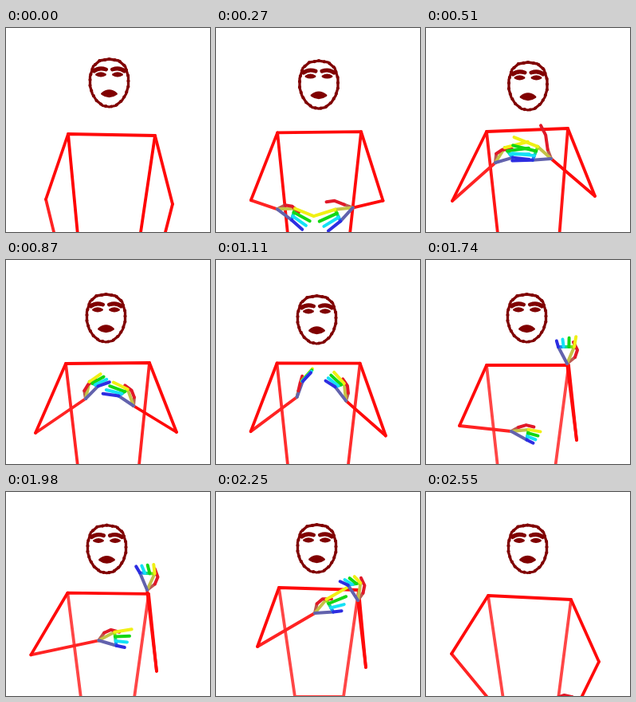
These frames come from a looping animation (256 by 256 pixels, 2580 ms). An HTML page with a canvas:

```html
<!DOCTYPE html>
<html>
<head>
<meta charset="utf-8">
<style>
  html, body { margin: 0; width: 100%; height: 100%; overflow: hidden; background: #fff; }
  canvas { display: block; }
</style>
</head>
<body>
<canvas id="stage" width="256" height="256"></canvas>
<script>
const ctx = document.getElementById('stage').getContext('2d');
const LOOP = 2580, STEP = 30, PALM = 21;
const DARK_RED = '#800000';

// Key poses: time, then the values that are eased between
const head = [[0, 129.5, 69], [510, 128, 73], [870, 125.5, 73], [1350, 127.5, 77],
  [1740, 126.5, 73], [2250, 126.5, 71], [2550, 127.5, 71.5]];
const shoulders = [[0, 78, 133, 187, 135], [510, 76, 130, 178, 126], [870, 75, 130, 180, 129],
  [1350, 78, 129, 181, 130], [1740, 76, 132, 179, 132], [2250, 79, 120, 179, 123], [2550, 78, 130, 182, 135]];
const hips = [[0, 91, 167], [870, 91, 166], [1740, 91, 161], [2250, 99, 160], [2550, 98, 165]];
const elbows = [[0, 50, 215, 209, 221], [510, 33, 217, 212, 211], [640, 21, 215, 219, 210],
  [870, 37, 217, 214, 216], [1350, 46, 212, 210, 224], [1740, 42, 208, 189, 226],
  [1960, 31, 205, 189, 225], [2250, 52, 194, 188, 220], [2550, 32, 203, 217, 213]];

// Hands: time, wrist x, y, palm angle, signed palm width, finger angle, reach, curl, thumb spread
const leftHand = [
  [0, 70, 297, 60, -14, 60, 20, 0.3, 0.5],
  [510, 87, 169, -39, -16, -4, 30, 0.3, 0],
  [870, 100, 174, -63, -12, -27, 17, 0.1, 0],
  [1350, 102, 170, -76, 6, -60, 24, 0.45, 2.5],
  [1740, 107, 215, 10, -13, 18, 15, 0.4, 0.8],
  [2250, 124, 152, -29, -18, -18, 30, 0.65, 0.3],
  [2550, 98, 283, 60, -14, 60, 20, 0.3, 0.5]];
const rightHand = [
  [0, 189, 299, -240, 14, -240, 20, 0.3, 0.5],
  [510, 157, 164, -159, 18, -170, 32, 0.2, 1.9],
  [870, 160, 183, -126, 14, -163, 20, 0, 0.45],
  [1350, 167, 163, -98, 11, -115, 19, 0.5, 0.5],
  [1740, 177, 130, -90, 20, -93, 13, 0.4, 0.4],
  [2250, 178, 136, -100, 16, -145, 11, 0, 0.55],
  [2550, 193, 262, -195, 14, -200, 20, 0.3, 0.8]];

// Cubic interpolation through the keys, flat at turning points
function sample(track, t) {
  let i = 0;
  while (i < track.length - 2 && t >= track[i + 1][0]) i++;
  const a = track[i], b = track[i + 1];
  const prev = track[i - 1] || a, next = track[i + 2] || b;
  const span = b[0] - a[0], u = (t - a[0]) / span, v = 1 - u;
  const slope = (p, q, r, k) =>
    (q[k] - p[k]) * (r[k] - q[k]) > 0 ? (r[k] - p[k]) / (r[0] - p[0]) * span : 0;
  return a.map((_, k) => a[k] * v * v * (1 + 2 * u) + b[k] * u * u * (1 + 2 * v)
    + slope(prev, a, b, k) * u * v * v - slope(a, b, next, k) * u * u * v).slice(1);
}

function line(color, ...points) {
  ctx.strokeStyle = color;
  ctx.beginPath();
  points.forEach(p => ctx.lineTo(...p));
  ctx.stroke();
}

const GRAY = [150, 150, 120];
const FINGERS = [[225, 25, 40], [240, 240, 20], [20, 215, 20], [20, 225, 245], [45, 45, 225]];
const mix = (a, b) => `rgb(${a.map((v, i) => (v + b[i]) / 2)})`;
const red = pale => `rgb(255,${pale},${pale})`;
const polar = ([x, y], degrees, r) =>
  [x + r * Math.cos(degrees * Math.PI / 180), y + r * Math.sin(degrees * Math.PI / 180)];

function drawHand([x, y, angle, width, bend, reach, curl, spread]) {
  const wrist = [x, y];
  // Along the palm, and across it towards the thumb
  const at = (along, across) => polar(polar(wrist, angle, along), angle + 90, across * width);
  const fingers = [[at(8, 0.5), at(17, 0.45 + spread / 2), at(27, spread)]];
  for (let i = 0; i < 4; i++) {
    const base = at(PALM, 0.45 - i / 3);
    const fan = (0.5 - i / 3) * 1.3 * width;
    fingers.push([base, polar(base, bend + fan, reach * (1 - curl * i / 3))]);
  }
  ctx.lineWidth = 4;
  for (const i of [0, 1, 4]) line(mix(GRAY, FINGERS[i]), wrist, fingers[i][0]);
  for (let i = 1; i < 4; i++) line(mix(FINGERS[i], FINGERS[i + 1]), fingers[i][0], fingers[i + 1][0]);
  fingers.forEach((f, i) => line(mix(FINGERS[i], FINGERS[i]), ...f));
}

const cheek = [[0, -30], [12, -28], [20, -21], [24, -8], [24, 4], [21, 14], [16, 22], [8, 28.5], [0, 30]];
const outline = [...cheek, ...cheek.map(([x, y]) => [-x, y]).reverse()];
const browEye = new Path2D('M4-17Q13-20 19-15');
const eye = new Path2D('M5-10.5Q10.5-14 16-10.5Q10.5-7.5 5-10.5Z');
const mouth = new Path2D('M-9 13.5Q0 6 9 13.5Q0 20 -9 13.5Z');

function drawFace(x, y) {
  ctx.save();
  ctx.translate(x, y);
  ctx.fillStyle = DARK_RED;
  ctx.lineWidth = 3.3;
  line(DARK_RED, ...outline);
  ctx.setLineDash([0, 7]);
  ctx.lineWidth = 4.2;
  line(DARK_RED, ...outline);
  ctx.setLineDash([]);
  const solid = path => { ctx.lineWidth = 2.8; ctx.fill(path); ctx.stroke(path); };
  solid(mouth);
  for (const side of [1, -1]) {
    ctx.scale(side, 1);
    solid(eye);
    ctx.lineWidth = 5;
    ctx.stroke(browEye);
  }
  ctx.restore();
}

function draw(t) {
  ctx.fillStyle = '#fff';
  ctx.fillRect(0, 0, 256, 256);
  ctx.lineCap = ctx.lineJoin = 'round';
  const [lx, ly, rx, ry] = sample(shoulders, t);
  const [elx, ely, erx, ery] = sample(elbows, t);
  const [hipL, hipR] = sample(hips, t);
  const left = sample(leftHand, t), right = sample(rightHand, t);
  const hipY = ly + 137;
  const bodyPale = 70 * Math.min(1, t / 1700);
  ctx.lineWidth = 3.8;
  line(red(bodyPale), [lx, ly], [hipL, hipY], [hipR, hipY], [rx, ry]);
  line(red(35), [elx, ely], left.slice(0, 2));
  line(red(10), [erx, ery], right.slice(0, 2));
  line(red(10), [elx, ely], [lx, ly], [rx, ry], [erx, ery]);
  drawFace(...sample(head, t));
  drawHand(left);
  drawHand(right);
}

function tick() {
  const t = Math.floor(performance.now() % LOOP / STEP) * STEP;
  draw(t < 60 ? 0 : t);
  requestAnimationFrame(tick);
}
tick();
</script>
</body>
</html>
```
